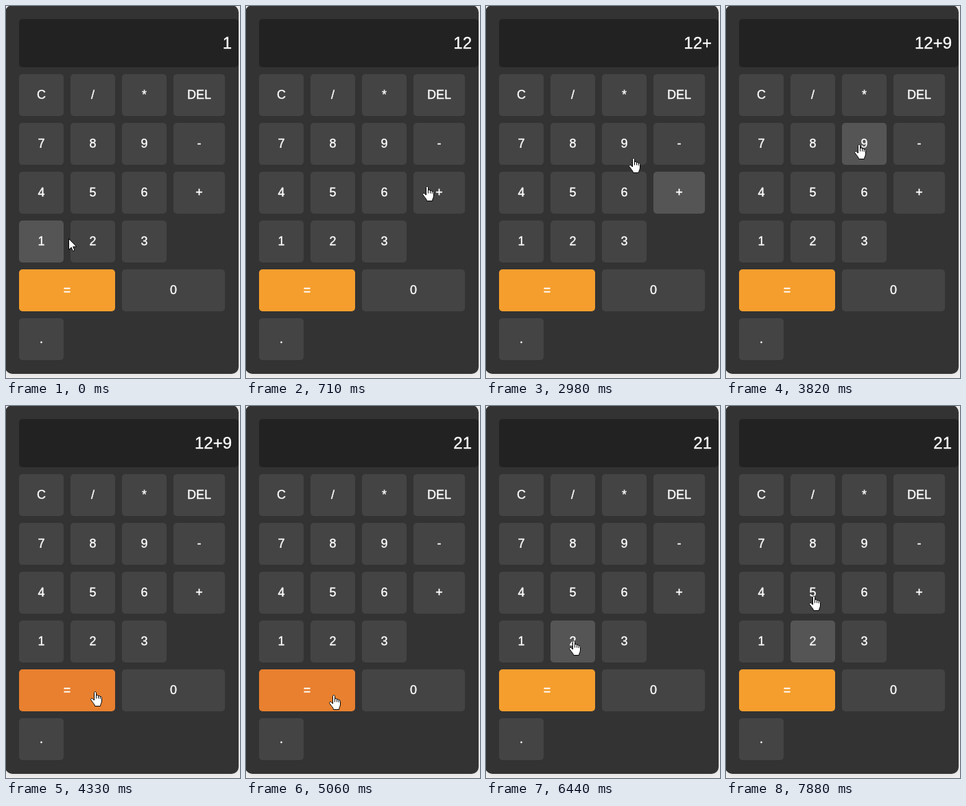
Recreate the animation shown at these times as an HTML page. Size 341 px wide and 541 px high, loop 8 s.

```html
<!DOCTYPE html>
<html lang="en">
<head>
<meta charset="utf-8">
<title>Calculator</title>
<style>
  html, body { margin: 0; width: 100%; height: 100%; overflow: hidden; background: #f0f0f0; }
  body {
    position: relative; color: #fff; -webkit-text-stroke: .35px #fff;
    font-family: Arial, "Liberation Sans", sans-serif;
  }
  #panel {
    position: absolute; left: -1px; top: -1px; width: 340px; height: 536px;
    border-radius: 10px; background: #333; box-shadow: 0 0 10px rgba(0, 0, 0, .1);
  }
  #display {
    position: absolute; left: 20px; top: 20px; width: 310px; height: 49px;
    padding: 21px 10px 0 0; border-radius: 5px;
    background: #222; font-size: 24px; line-height: 27px; text-align: right;
  }
  #keys {
    position: absolute; left: 20px; top: 100px; display: grid; gap: 10px;
    grid-template-columns: 65px 65px 65px 75px; grid-auto-rows: 61px;
  }
  .key {
    box-sizing: border-box; padding-top: 20px; border-radius: 5px;
    background: #444; font-size: 18px; line-height: 21px; text-align: center;
  }
  .key.hover { background: #555; }
  .key.equals { grid-column: 1 / span 2; background: #f59e2d; }
  .key.equals.hover { background: #e8802f; }
  .key.zero { grid-column: 3 / span 2; }
  .key.row-start { grid-column: 1; }
  svg { position: absolute; left: 0; top: 0; overflow: visible; pointer-events: none; }
  path { fill: #fff; stroke: #000; stroke-linejoin: round; }
</style>
</head>
<body>
<div id="panel">
  <div id="display"></div>
  <div id="keys"></div>
</div>
<svg id="cursor" width="17" height="22">
  <path id="arrow" d="M.5 .5V16.5L4.2 13 6.5 18.5 9 17.4 6.7 12H11.8Z"/>
  <g id="hand" transform="translate(-7 0)">
    <path d="M5.5 13V2.2C5.5 0 8.5 0 8.5 2.2V6.2C9 5 11.5 5 11.5 7C12 6 14 6 14.2 8C15 7 16.5 7.5 16.5 9.5V14C16.5 17 14.5 18.5 14.5 21.5H6.5C6.5 19 3.5 16.5 .8 12.5C0 10.5 2.5 9.5 3.5 11Z"/>
    <path style="fill:none" d="M8.5 6V10.5M11.5 7V10.5M14.2 8V11"/>
  </g>
</svg>
<script>
  const LOOP = 8000;
  const HOVER_DELAY = 150;
  const HAND_FROM = 170;
  const $ = id => document.getElementById(id);

  const origin = { x: 70, y: 333 };
  const glides = [
    { leave: -60, arrive: 0, x: 91, y: 338 },
    { leave: 140, arrive: 170, x: 104, y: 345 },
    { leave: 500, arrive: 710, x: 264, y: 262 },
    { leave: 830, arrive: 1340, x: 298, y: 264 },
    { leave: 2960, arrive: 2980, x: 215, y: 221 },
    { leave: 2980, arrive: 3250, x: 194, y: 200 },
    { leave: 3820, arrive: 4180, x: 135, y: 400 },
    { leave: 4180, arrive: 4480, x: 128, y: 420 },
    { leave: 6140, arrive: 6160, x: 128, y: 382 },
    { leave: 6160, arrive: 6440, x: 128, y: 341 },
    { leave: 7700, arrive: 7880, x: 128, y: 276 }
  ];
  const presses = { 2: 300, '+': 1460, 9: 3670, '=': 5060 };

  const layout = { '=': 'equals', 0: 'zero', '.': 'row-start', 1: 'row-start' };
  const keys = 'C / * DEL 7 8 9 - 4 5 6 + 1 2 3 = 0 .'.split(' ').map(label => {
    const key = document.createElement('div');
    key.className = 'key ' + (layout[label] || '');
    key.textContent = label;
    $('keys').append(key);
    return key;
  });

  // Each glide pulls the pointer from wherever the earlier ones left it.
  function pointerAt(t) {
    let { x, y } = origin;
    for (const { leave, arrive, x: toX, y: toY } of glides) {
      const u = Math.min(1, Math.max(0, (t - leave) / (arrive - leave)));
      const eased = u * (2 - u);
      x += (toX - x) * eased;
      y += (toY - y) * eased;
    }
    return { x: Math.round(x), y: Math.round(y) };
  }

  function readoutAt(t) {
    const pressed = label => t >= presses[label];
    if (pressed('=')) return 12 + 9;
    return '1' + ['2', '+', '9'].filter(pressed).join('');
  }

  function draw(now) {
    const t = now % LOOP;
    const tip = pointerAt(t);
    const earlier = pointerAt(t - HOVER_DELAY);
    const hovered = document.elementFromPoint(earlier.x, earlier.y);
    const isHand = t >= HAND_FROM;

    $('cursor').style.transform = `translate(${tip.x}px, ${tip.y}px)`;
    $('arrow').style.display = isHand ? 'none' : '';
    $('hand').style.display = isHand ? '' : 'none';
    $('display').textContent = readoutAt(t);
    keys.forEach(key => key.classList.toggle('hover', key === hovered));
    requestAnimationFrame(() => draw(performance.now()));
  }
  draw(0);
</script>
</body>
</html>
```
